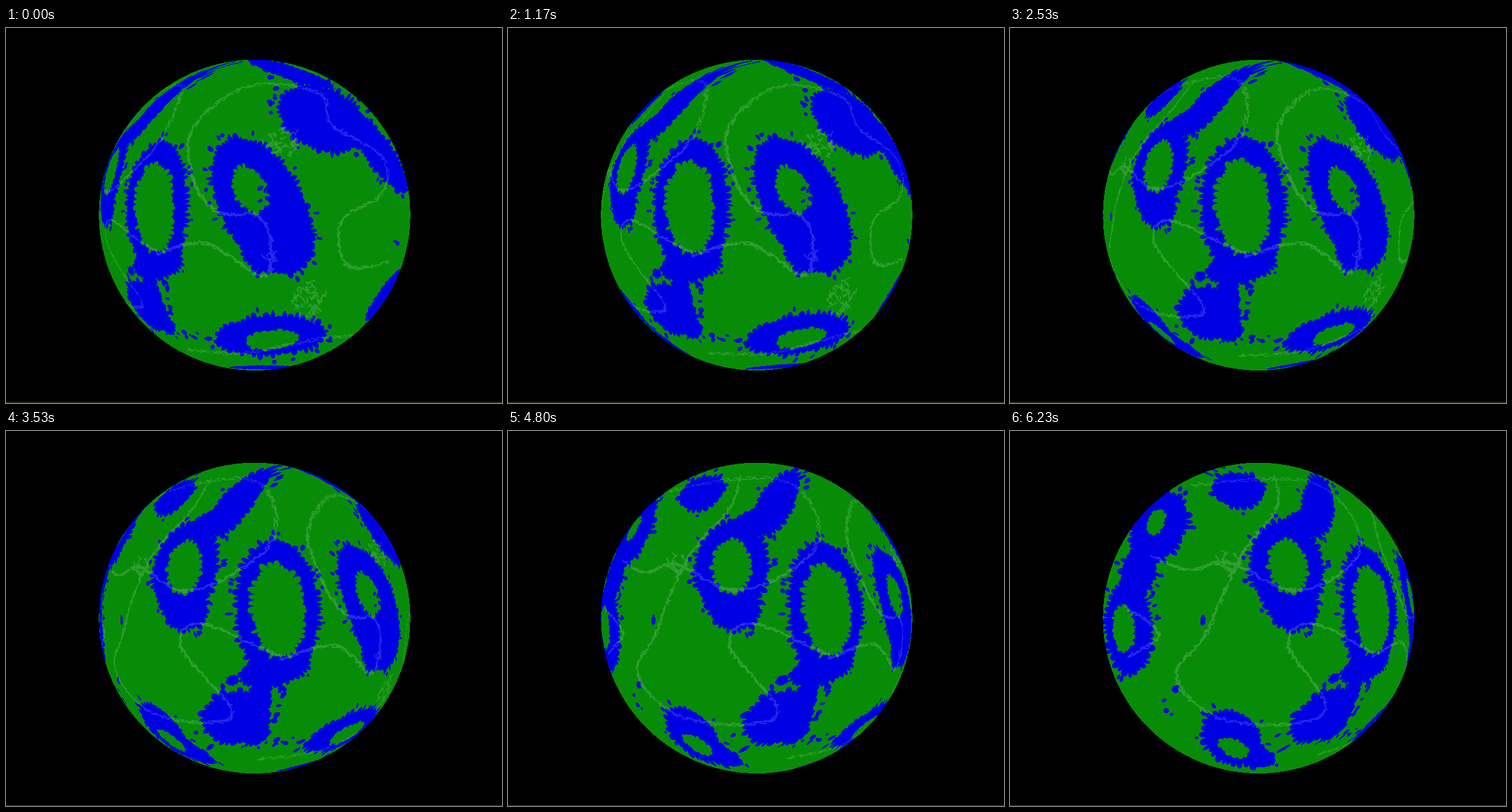
Animation, 792 px wide and 600 px high, one loop 6.26 s. Source, as an HTML page with a canvas:

```html
<!DOCTYPE html>
<html lang="en">
<head>
<meta charset="utf-8">
<title>Rotating globe</title>
<style>
  html, body { margin: 0; width: 100%; height: 100%; overflow: hidden; background: #000; }
  canvas { display: block; width: 792px; height: 600px; }
</style>
</head>
<body>
<canvas id="stage" width="792" height="600"></canvas>
<script>
const W = 792, H = 600, CX = 397, CY = 299.3, R = 248.6;
const TW = 2048, TH = 1024;
const LOOP = 6260, DEG = Math.PI / 180;
const GREEN = '#088c08', BLUE = '#0000e4', TRAIL = 'rgba(255,255,255,.17)';

let seed = 7;
function rnd() {
  seed = (seed * 1664525 + 1013904223) >>> 0;
  return seed / 4294967296;
}
const between = (a, b) => a + (b - a) * rnd();

// Shapes are placed as seen on screen while the globe is turned by this many degrees.
let turn = 0;

// Screen point to map point; the eye is three radii from the centre.
function toMap(x, y) {
  const u = (x - CX) / R, v = (y - CY) / R;
  const r2 = Math.min(1, u * u + v * v);
  const s = (3 - Math.sqrt(1 - r2)) / (1 + r2 / 8);
  const k = s / Math.sqrt(8);
  const lon = Math.atan2(u * k, 3 - s) / DEG;
  const lat = Math.asin(Math.max(-1, Math.min(1, v * k))) / DEG;
  return [(lon - turn + 180) * TW / 360, (lat + 90) * TH / 180];
}

const map = document.createElement('canvas');
map.width = TW;
map.height = TH;
const m = map.getContext('2d', { willReadFrequently: true });
m.fillStyle = GREEN;
m.fillRect(0, 0, TW, TH);

function fillEllipse(x, y, rx, ry, tilt, bulge = () => 0) {
  const c = Math.cos(tilt), s = Math.sin(tilt);
  const steps = Math.ceil(4 * (rx + ry));
  m.beginPath();
  for (let i = 0; i < steps; i++) {
    const a = 2 * Math.PI * i / steps;
    const arc = 2 * Math.PI / steps * Math.hypot(rx * Math.sin(a), ry * Math.cos(a));
    let nx = Math.cos(a) * ry, ny = Math.sin(a) * rx;
    const len = Math.hypot(nx, ny), off = bulge(arc);
    const px = rx * Math.cos(a) + off * nx / len, py = ry * Math.sin(a) + off * ny / len;
    m.lineTo(...toMap(x + px * c - py * s, y + px * s + py * c));
  }
  m.fill();
}

// Rounded petals of random size along an edge.
function petals(amp) {
  let run = 0, size = 9, height = amp;
  return arc => {
    run += arc;
    if (run >= size) {
      run = 0;
      size = between(6, 13);
      height = amp * between(0.3, 1.8);
    }
    return height * Math.sqrt(Math.sin(Math.PI * run / size)) - amp * 0.6;
  };
}

function blob(color, x, y, rx, ry, tilt) {
  m.fillStyle = color;
  fillEllipse(x, y, rx, ry, tilt * DEG, petals(Math.min(7, rx * 0.2, ry * 0.2)));
}

const land = (x, y, rx, ry, tilt = 0) => blob(GREEN, x, y, rx, ry, tilt);

// Water has loose drops around its edge.
function sea(x, y, rx, ry, tilt = 0) {
  blob(BLUE, x, y, rx, ry, tilt);
  const gap = Math.min(10, ry * 0.3, rx * 0.3);
  for (let i = 0; i < (rx + ry) / 14; i++) {
    const a = between(0, 2 * Math.PI), t = tilt * DEG;
    const px = (rx + gap) * Math.cos(a), py = (ry + gap) * Math.sin(a);
    fillEllipse(x + px * Math.cos(t) - py * Math.sin(t), y + px * Math.sin(t) + py * Math.cos(t),
      gap * between(0.25, 0.6), gap * between(0.2, 0.4), a + t);
  }
}

function drops(x, y, w, h, count) {
  m.fillStyle = BLUE;
  for (let i = 0; i < count; i++) {
    fillEllipse(x + between(-w, w), y + between(-h, h), between(2, 6), between(2, 4), between(-0.6, 0.6));
  }
}

const trails = new Path2D();

// Ragged line along a Catmull-Rom curve through a few points.
function trail(...flat) {
  const at = (i, k) => flat[2 * Math.max(0, Math.min(flat.length / 2 - 1, i)) + k];
  for (let pass = 0; pass < 3; pass++) {
    trails.moveTo(...toMap(at(0, 0), at(0, 1)));
    for (let i = 0; i < flat.length / 2 - 1; i++) {
      const steps = Math.ceil(Math.hypot(at(i + 1, 0) - at(i, 0), at(i + 1, 1) - at(i, 1)) / 4);
      for (let j = 1; j <= steps; j++) {
        const t = j / steps;
        const [x, y] = [0, 1].map(k => {
          const a = at(i - 1, k), b = at(i, k), c = at(i + 1, k), d = at(i + 2, k);
          return b + 0.5 * t * (c - a + t * (2 * a - 5 * b + 4 * c - d + t * (3 * b - a - 3 * c + d)));
        });
        const step = rnd() < 0.2 ? 'moveTo' : 'lineTo';
        trails[step](...toMap(x + between(-3, 3), y + between(-3, 3)));
      }
    }
  }
}

// A patch of short criss-cross trails.
function mesh(x, y, w, h) {
  for (let i = 0; i < w * h / 18; i++) {
    const a = between(0, 2 * Math.PI), r = Math.sqrt(rnd());
    let px = x + w * r * Math.cos(a), py = y + h * r * Math.sin(a);
    trails.moveTo(...toMap(px, py));
    for (let j = 0; j < 4; j++) {
      px += between(-5, 5);
      py += between(-5, 5);
      trails.lineTo(...toMap(px, py));
    }
  }
}

function paintMiddle() {
  turn = -4.2;
  sea(371, 286, 67, 113);
  sea(368, 380, 57, 28, -12);
  sea(346, 430, 20, 32);
  sea(317, 456, 50, 42, 20);
  sea(350, 480, 20, 22);
  sea(303, 397, 9, 8);
  land(371, 287, 43, 76, -4);
  drops(380, 450, 6, 45, 8);
  drops(410, 499, 30, 6, 8);
}

function paintEast() {
  turn = -29.4;
  sea(409, 285, 67, 120, -28);
  sea(430, 355, 55, 37);
  land(390, 258, 26, 38, -25);
  drops(408, 268, 14, 25, 5);

  sea(505, 145, 74, 50, 25);
  sea(592, 195, 82, 22, 55);
  sea(455, 72, 72, 11, 18);
  drops(425, 105, 10, 35, 8);

  sea(422, 492, 88, 33, -3);
  land(425, 499, 42, 15, -6);
  sea(412, 543, 55, 3);
  sea(602, 428, 50, 8, -56);
  drops(624, 344, 4, 8, 2);

  trail(240,362, 320,345, 410,398, 422,340, 400,300, 340,295, 300,245, 298,160, 390,92, 500,105,
    520,155, 600,205, 600,265, 535,310, 545,380, 610,375);
  trail(290,515, 380,520, 485,500, 560,490);
  mesh(440, 182, 32, 20);
  mesh(480, 437, 26, 28);
  mesh(422, 368, 8, 26);
}

function paintWest() {
  turn = 26.2;
  sea(392, 220, 60, 76);
  sea(400, 285, 42, 35);
  sea(418, 150, 45, 22, -30);
  sea(455, 118, 29, 54, 22);
  land(393, 215, 31, 43, -4);
  sea(332, 97, 40, 28, -12);

  trail(270,92, 390,76, 470,85, 520,140, 510,205, 405,255, 300,212, 245,225, 200,205);
  trail(392,70, 385,120, 318,205, 265,325, 228,390, 290,455, 400,470, 463,445, 392,345, 430,308, 545,358);
  mesh(303, 212, 22, 12);
}

function paintFarWest() {
  turn = 35;
  sea(238, 155, 41, 61, 28);
  sea(205, 225, 28, 45, 15);
  sea(190, 316, 37, 75, -3);
  land(181, 317, 17, 37, -3);
  land(233, 146, 13, 22, 25);
  sea(355, 490, 50, 42, 35);
  sea(390, 520, 34, 18, 15);
  land(357, 507, 25, 13, 25);
  sea(308, 303, 4, 8);
  drops(255, 430, 12, 32, 6);
  trail(185,282, 238,325, 190,360);
}

paintMiddle();
paintEast();
paintWest();
paintFarWest();
m.strokeStyle = TRAIL;
m.lineWidth = 2;
m.stroke(trails);

const texels = new Uint32Array(m.getImageData(0, 0, TW, TH).data.buffer);

// For each pixel of the disc: its place on stage, its map row and its map column.
turn = 0;
const spots = [], rows = [], cols = [];
for (let y = 48; y < 552; y++) {
  for (let x = 146; x < 649; x++) {
    if (Math.hypot(x + 0.5 - CX, y + 0.5 - CY) > R) continue;
    const [tx, ty] = toMap(x + 0.5, y + 0.5);
    spots.push(y * W + x);
    rows.push(Math.min(TH - 1, Math.floor(ty)) * TW);
    cols.push(tx);
  }
}
const spot = Uint32Array.from(spots), row = Uint32Array.from(rows), col = Float32Array.from(cols);

const ctx = document.getElementById('stage').getContext('2d');
ctx.fillStyle = '#000';
ctx.fillRect(0, 0, W, H);
ctx.fillStyle = '#26260a';
ctx.fillRect(0, 598, W, 2);
const picture = ctx.getImageData(0, 0, W, H);
const pixels = new Uint32Array(picture.data.buffer);

// Degrees turned; the first stretch runs a little slower.
const turnAt = t => -18.4 + (t - 1170) * (t < 1170 ? 0.0094 : 0.01055);

function draw(t) {
  const shift = TW - turnAt(t) * TW / 360;
  for (let i = 0; i < spot.length; i++) {
    pixels[spot[i]] = texels[row[i] + ((col[i] + shift) & (TW - 1))];
  }
  ctx.putImageData(picture, 0, 0);
}

const start = performance.now();
function tick() {
  draw((performance.now() - start) % LOOP);
  requestAnimationFrame(tick);
}
tick();
</script>
</body>
</html>
```
